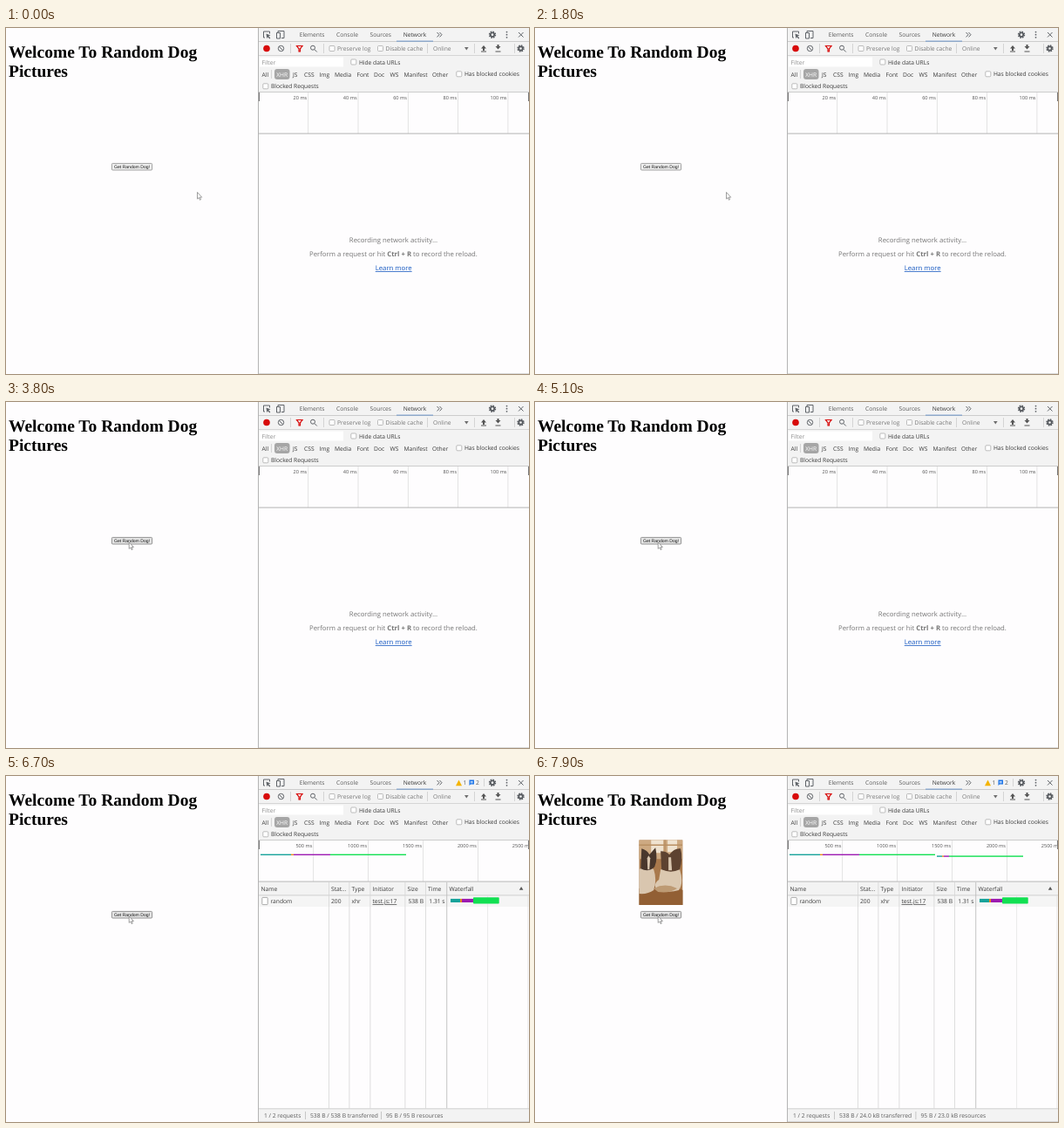
An HTML page for the animation above (8000 ms loop, 600x397 px).

```html
<!DOCTYPE html>
<html lang="en">
<head>
<meta charset="utf-8">
<style>
  html, body { margin: 0; width: 100%; height: 100%; overflow: hidden; background: #fefdfe; }
  svg { display: block; width: 600px; height: 397px; }
  text { font: 6.7px "Open Sans", "Noto Sans", sans-serif; fill: #5a5a5a; text-rendering: geometricPrecision; white-space: pre; }
  .dark { fill: #3a3a3a; }
  .soft { fill: #777; }
  .pale { fill: #8a8a8a; }
  .tick { font-size: 5.6px; text-anchor: end; fill: #555; }
  .end { text-anchor: end; }
  .idle { font-size: 7.75px; text-anchor: middle; fill: #757575; }
  .link { fill: #1558c0; text-decoration: underline; }
  .under { text-decoration: underline; }
  .title { font: bold 19.5px "Liberation Serif", serif; fill: #000; }
  .label { font: 5.1px "Liberation Sans", sans-serif; fill: #111; text-anchor: middle; }
  .icon { fill: none; stroke: #5f6368; stroke-width: 1; }
</style>
</head>
<body>
<svg id="stage" viewBox="0 0 600 397"></svg>
<script>
const LOOP = 8000, STEP = 100;
const HOVER = 3400, PRESS = 4800, RELEASE = 5100, SENT = 5200, REPLY = 6500, LOADED = 7200;

const text = (x, y, s, cls = '') => `<text x="${x}" y="${y}" class="${cls}">${s}</text>`;
const rect = (x, y, w, h, fill, more = '') => `<rect x="${x}" y="${y}" width="${w}" height="${h}" fill="${fill}" ${more}/>`;
const path = (d, more = 'class="icon"') => `<path d="${d}" ${more}/>`;
const hline = (y, c, x = 290) => rect(x, y, 600 - x, 1, c);
const check = (x, y, s, cls = 'dark') =>
  rect(x + .5, y - 5.5, 6, 6, '#fff', 'rx="1" stroke="#a2a2a2" stroke-width=".7"') + text(x + 9.6, y, s, cls);
const during = (from, to, body) => `<g data-from="${from}" data-to="${to}">${body}</g>`;
const gear = (x, y) =>
  `<circle cx="${x}" cy="${y}" r="3.3" fill="none" stroke="#55595e" stroke-dasharray="1.5 1.09" stroke-width="1.8"/>` +
  `<circle cx="${x}" cy="${y}" r="2.2" fill="none" stroke="#55595e" stroke-width="1.7"/>`;
const ticks = (first, gap, step) => [1, 2, 3, 4, 5].map(i => {
  const x = first + gap * (i - 1);
  return rect(x, 74, .8, 47, '#dcdcdc') + text(x - 1, 82.3, i * step + ' ms', 'tick');
}).join('');
// Consecutive bar segments: [colour, end x]
const bar = (x, y, h, parts) => parts.map(([c, end]) => {
  const r = rect(x, y, end - x, h, c);
  x = end;
  return r;
}).join('');
const footer = (a, x1, b, x2, c) => text(296, 391.8, a) + rect(x1 - 6, 385, .8, 9, '#bbb') + text(x1, 391.8, b) +
  rect(x2 - 6, 385, .8, 9, '#bbb') + text(x2, 391.8, c);

const TEAL = '#16a29a', ORANGE = '#e88a1c', PURPLE = '#9c1ab1', GREEN = '#12e052';

const page = text(3, 34, 'Welcome To Random Dog', 'title') + text(3, 56, 'Pictures', 'title') +
  during(LOADED, LOOP, `<svg x="119.3" y="73.3" width="50.2" height="74.7" viewBox="0 0 50.5 75">
    <rect width="50.5" height="75" fill="#a9794c"/>
    <rect width="50.5" height="22" fill="#cda981"/>
    <path d="M14 0H28V15H14zM33 0H44V14H33z" fill="#efe2cf"/>
    <path d="M0 6H50M30 0V20" stroke="#b98f63" stroke-width="1.5" fill="none"/>
    <path d="M0 56Q25 48 51 58V75H0z" fill="#925f34"/>
    <path d="M0 34Q9 27 17 34Q21 46 17 58Q10 63 0 62z" fill="#d9c6af"/>
    <path d="M2 33L3 10Q10 12 12 17L19 9Q22 22 18 31Q11 38 2 33z" fill="#49372c"/>
    <path d="M9.5 21L11 18L13 21L12 34H10z" fill="#d9c6af"/>
    <path d="M25 34Q37 28 47 34Q52 49 46 58Q33 62 20 57Q16 51 23 46z" fill="#dbc8b0"/>
    <path d="M26 34L25 13Q32 13 35 17Q41 9 48 10Q51 21 47 34Q37 39 26 34z" fill="#5d4230"/>
    <path d="M34 20H37L38 35H34z" fill="#d9c6af"/>
    <path d="M17 56Q30 49 44 56Q35 62 22 60z" fill="#bd9a73"/>
  </svg>`) +
  rect(121.4, 155.4, 46.2, 7.6, '#efefef', 'id="button" rx="1" stroke="#8b8b8b" stroke-width=".8"') +
  text(144.5, 161, 'Get Random Dog!', 'label');

const tabs = path('M297 11h-1.5v-7h7v2.5') + path('M298.5 6.5l5 2-2.2.8 2 2.2-1 .9-2-2.1-1 1.9z', 'fill="#5f6368"') +
  path('M312 5V3.5h7v8h-3M310.5 5.5h4v6.5h-4z') +
  text(336.7, 10.2, 'Elements') + text(379, 10.2, 'Console') + text(417.5, 10.2, 'Sources') +
  text(455.7, 10.2, 'Network', 'dark') + rect(448, 14.6, 42, 1, '#6b93c8') +
  path('M494.5 5l2.5 2.7-2.5 2.7M497.5 5l2.5 2.7-2.5 2.7') +
  during(REPLY, LOOP, path('M519.5 4.5l3.5 6.7h-7z', 'fill="#f4b400"') + text(524.5, 10.2, '1') +
    path('M531.5 4.5h5.5v5h-4l-1.5 1.5z', 'fill="#1a73e8"') + rect(532.7, 6, 3, .7, '#fff') +
    rect(532.7, 7.5, 3, .7, '#fff') + text(539, 10.2, '2') + rect(548, 3, .8, 9, '#ccc')) +
  gear(558, 7.7) + [4.6, 7.7, 10.8].map(y => `<circle cx="574.5" cy="${y}" r=".9" fill="#5f6368"/>`).join('') +
  path('M588 5l5.5 5.5M593.5 5l-5.5 5.5');

const tools = '<circle cx="299" cy="23.5" r="3.8" fill="#d80b0b"/>' +
  '<circle cx="315.5" cy="23.5" r="3.2" class="icon"/>' + path('M313.3 21.3l4.4 4.4') +
  rect(326, 18, .8, 11, '#ccc') + path('M333.5 20.5h6.5l-2.5 3.3v3.2h-1.5v-3.2z', 'fill="none" stroke="#d80b0b" stroke-width="1.2"') +
  '<circle cx="352" cy="22.7" r="2.5" class="icon"/>' + path('M354 24.7l2.8 2.8') + rect(364, 18, .8, 11, '#ccc') +
  check(370.5, 26, 'Preserve log', 'soft') + check(426, 26, 'Disable cache', 'soft') + rect(483, 18, .8, 11, '#ccc') +
  text(490, 26, 'Online', 'soft') + path('M526 22h4.6l-2.3 3.4z', 'fill="#6e6e6e"') + rect(537, 18, .8, 11, '#ccc') +
  path('M548 20l3 3.5h-2v2.5h-2v-2.5h-2zM545 26.5h6v1h-6z', 'fill="#555"') +
  path('M564.5 24.5l3-3.5h-2v-2h-2v2h-2zM561.5 26.5h6v1h-6z', 'fill="#555"') +
  rect(583, 18, .8, 11, '#ccc') + gear(590.5, 23.5);

const kinds = [[293.5, 'All'], [329, 'JS'], [342, 'CSS'], [359.5, 'Img'], [377, 'Media'], [402.5, 'Font'], [422, 'Doc'],
  [440.5, 'WS'], [456.5, 'Manifest'], [489, 'Other']];
const filters = rect(291, 33.5, 96, 11, '#fff') + text(293.5, 41.5, 'Filter', 'pale') + check(395.3, 41.5, 'Hide data URLs') +
  kinds.map(([x, s]) => text(x, 55.7, s, 'dark')).join('') +
  rect(304, 48, .8, 10, '#ccc') + rect(308, 47, 17.5, 12, '#a6a6a6', 'rx="3"') +
  '<text x="310.2" y="55.7" style="fill:#fff">XHR</text>' +
  check(516.3, 55.3, 'Has blocked cookies') + check(294.3, 69.3, 'Blocked Requests');

const overview = rect(290, 74, 310, 47, '#fefdfe') +
  during(0, REPLY, ticks(346.3, 57.3, 20)) +
  during(REPLY, LOOP, ticks(352.3, 62.9, 500) +
    bar(292, 89.6, 1.4, [[TEAL, 327], [ORANGE, 330], [PURPLE, 372], [GREEN, 459]])) +
  during(LOADED, LOOP, bar(461, 91.4, 1.4, [[TEAL, 467], [ORANGE, 469], [PURPLE, 475], [GREEN, 560]])) +
  rect(290, 74, 1, 10, '#777') + rect(599, 74, 1, 10, '#777') +
  hline(73, '#ccc') + hline(120.6, '#b4b4b4');

const idle = during(0, SENT, text(444.5, 246.2, 'Recording network activity…', 'idle') +
  text(444.5, 262.3, 'Perform a request or hit <tspan font-weight="bold">Ctrl + R</tspan> to record the reload.', 'idle') +
  text(444.7, 278.2, 'Learn more', 'idle link'));

const heads = [[292.5, 'Name'], [373, 'Stat…'], [396.5, 'Type'], [420.5, 'Initiator'], [460.5, 'Size'], [484, 'Time'], [508.5, 'Waterfall']];
const table = during(SENT, LOOP, rect(290, 122, 310, 15, '#f3f3f3') + rect(290, 137, 310, 13, '#f5f5f5') +
  hline(136.4, '#cfcfcf') +
  [370, 393.5, 417.5, 457.5, 481].map(x => rect(x, 122, .8, 259.5, '#d6d6d6')).join('') +
  rect(505.3, 122, .9, 259.5, '#bdbdbd') + [552.3, 598.5].map(x => rect(x, 137, .8, 244.5, '#e4e4e4')).join('') +
  heads.map(([x, s]) => text(x, 131.8, s, 'dark')).join('') + path('M588.8 130.7l2.3-3.7 2.3 3.7z', 'fill="#555"') +
  rect(293.8, 139.4, 6.4, 8.2, '#fff', 'rx=".8" stroke="#999" stroke-width=".8"') +
  text(303.5, 146.2, 'random', 'dark') + text(396.5, 146.2, 'xhr', 'dark') + text(420.5, 146.2, 'test.js:17', 'dark under') +
  rect(290, 382, 310, 15, '#f3f3f3') + hline(381.3, '#cfcfcf')) +
  during(SENT, REPLY, text(373, 146.2, '(pe…', 'pale') + text(479, 146.2, '0 B', 'dark end') + text(484, 146.2, 'Pen…', 'pale') +
    footer('1 requests', 339, '0 B transferred', 396, '0 B resources')) +
  during(REPLY, LOOP, text(373, 146.2, '200', 'dark') + text(479, 146.2, '538 B', 'dark end') + text(503.5, 146.2, '1.31 s', 'dark end') +
    bar(510, 140.9, 4.1, [[TEAL, 521], [ORANGE, 523], [PURPLE, 536]]) + rect(536, 139.2, 29.7, 7.4, GREEN, 'rx=".8"')) +
  during(REPLY, LOADED, footer('1 / 2 requests', 349, '538 B / 538 B transferred', 436, '95 B / 95 B resources')) +
  during(LOADED, LOOP, footer('1 / 2 requests', 349, '538 B / 24.0 kB transferred', 442.5, '95 B / 23.0 kB resources'));

const stage = document.getElementById('stage');
stage.innerHTML = page + rect(290, 0, 310, 73, '#f3f3f3') + hline(15, '#ccc') + hline(31, '#d5d5d5') +
  tabs + tools + filters + overview + idle + table + rect(289, 0, 1, 397, '#b4b4b4') + hline(396.3, '#ccc') +
  path('M0 0v7.6l1.7-1.5 1.2 2.7 1.2-.6-1.2-2.5h2.3z', 'id="cursor" fill="#fff" stroke="#777" stroke-width=".7"');

const timed = [...stage.querySelectorAll('[data-from]')];
const button = document.getElementById('button');
const cursor = document.getElementById('cursor');

// Cursor track: [time, x, y]
const track = [[0, 219.5, 188.5], [2000, 219.5, 188.5], [2200, 190, 213], [2400, 149, 172], [2500, 173, 196], [2600, 173, 196],
  [2900, 149.3, 172.5], [3200, 129, 149], [3300, 129, 149], [3800, 141.2, 160.8], [LOOP, 141.2, 160.8]];

function cursorAt(t) {
  const i = track.findIndex(p => p[0] > t);
  const [t0, x0, y0] = track[i - 1], [t1, x1, y1] = track[i];
  const k = (t - t0) / (t1 - t0);
  return [x0 + (x1 - x0) * k, y0 + (y1 - y0) * k];
}

function draw(now) {
  const t = Math.floor(now % LOOP / STEP) * STEP;
  for (const g of timed) g.style.display = t >= +g.dataset.from && t < +g.dataset.to ? '' : 'none';
  const [fill, stroke] = t < HOVER ? ['#efefef', '#8b8b8b']
    : t >= PRESS && t < RELEASE ? ['#f5f5f5', '#9a9a9a'] : ['#e5e5e5', '#7a7a7a'];
  button.setAttribute('fill', fill);
  button.setAttribute('stroke', stroke);
  cursor.setAttribute('transform', `translate(${cursorAt(t)})`);
}

const start = performance.now();
function frame() {
  draw(performance.now() - start);
  requestAnimationFrame(frame);
}
frame();
</script>
</body>
</html>
```
